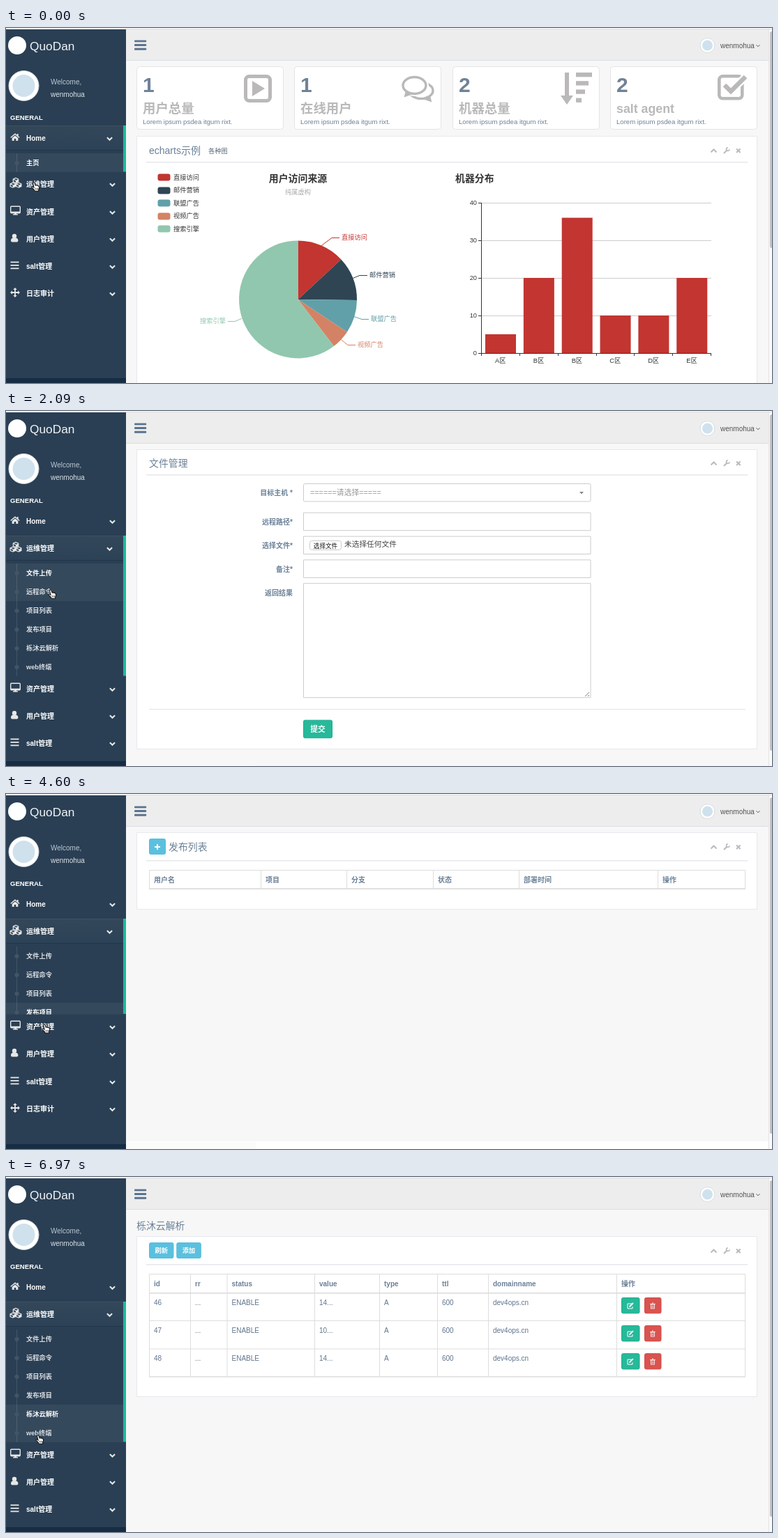
An HTML page with a canvas that plays this animation: 1098x510 px, repeating every 8000 ms.

```html
<!DOCTYPE html>
<html lang="zh-CN">
<head>
<meta charset="utf-8">
<title>Admin console</title>
<style>
html, body { margin: 0; width: 100%; height: 100%; overflow: hidden; background: #fff; }
canvas { display: block; width: 1098px; height: 510px; }
</style>
</head>
<body>
<canvas id="stage" width="1098" height="510"></canvas>
<script>
const ctx = document.getElementById('stage').getContext('2d');
const LOOP = 8000, ROW = 27, PITCH = 39.27;
const FONT = '"Liberation Sans", "Noto Sans CJK SC", "Noto Sans CJK", sans-serif';
const SLATE = '#6b8097', TEAL = '#1abb9c', GREEN = '#26b99a', SKY = '#5bc0de', GREY = '#bab8b8', RED = '#c23531';
const BRAND = 'QuoDan', USER = 'wenmohua';

// The screen refreshes only at these moments.
const ticks = [0, 150, 480, 630, 780, 930, 1290, 1440, 1590, 1740, 1890, 2090, 2390, 2540, 2690, 2840, 3050,
  3380, 3530, 3680, 3830, 4010, 4450, 4600, 4780, 4930, 5080, 5240, 5420, 5570, 5870, 6020, 6170, 6320, 6470, 6670, 6970];
const MENU_CLICK = 430;
const loads = [
  { at: 1540, page: filePage }, { at: 2340, page: remotePage }, { at: 3330, page: () => listPage('项目列表') },
  { at: 4374, page: () => listPage('发布列表') }, { at: 5731, page: dnsPage }
];
const pointerPath = [[0, 42, 228], [780, 42, 228], [930, 46, 231], [1290, 62, 246], [1440, 66, 250], [1740, 66, 250],
  [2090, 66, 263], [2540, 66, 263], [3050, 66, 293], [3530, 66, 293], [4010, 60, 322], [4450, 58, 327],
  [4600, 57, 337], [5080, 56, 357], [5420, 56, 358], [5570, 51, 349], [6020, 51, 349], [6670, 50, 376], [6970, 48, 377]];
const subItems = ['文件上传', '远程命令', '项目列表', '发布项目', '栎沐云解析', 'web终端'];
const menu = [['Home', homeIcon], ['运维管理', cubesIcon], ['资产管理', desktopIcon],
  ['用户管理', userIcon], ['salt管理', barsIcon], ['日志审计', arrowsIcon]];

const clamp = v => Math.max(0, Math.min(1, v));
const swing = p => 0.5 - Math.cos(Math.PI * clamp(p)) / 2;

function rect(x, y, w, h, color) {
  ctx.fillStyle = color;
  ctx.fillRect(x, y, w, h);
}
function box(x, y, w, h, fill, stroke, r = 0) {
  ctx.beginPath();
  ctx.roundRect(x + .5, y + .5, w - 1, h - 1, r);
  paint(fill, stroke);
}
function paint(fill, stroke, width = 1) {
  if (fill) { ctx.fillStyle = fill; ctx.fill(); }
  if (stroke) { ctx.strokeStyle = stroke; ctx.lineWidth = width; ctx.stroke(); }
}
function disc(x, y, r, fill, stroke, width) {
  ctx.beginPath();
  ctx.arc(x, y, r, 0, 7);
  paint(fill, stroke, width);
}
function trace(points, closed) {
  ctx.beginPath();
  for (const [x, y] of points) ctx.lineTo(x, y);
  if (closed) ctx.closePath();
}
function poly(points, color) { trace(points, true); paint(color); }
function line(points, color, width = 1) { trace(points); paint(null, color, width); }

// y is the optical middle of the line of text.
function text(str, x, y, size, color, bold = false, align = 'left') {
  ctx.font = `${bold ? 'bold ' : ''}${size}px ${FONT}`;
  ctx.textAlign = align;
  ctx.fillStyle = color;
  ctx.fillText(str, x, y + size * .37);
}
function at(x, y, draw) {
  ctx.save();
  ctx.translate(x, y);
  draw();
  ctx.restore();
}
function chevron(x, y, w, dir, color, width) {
  line([[x - w, y - dir * w / 2], [x, y + dir * w / 2], [x + w, y - dir * w / 2]], color, width);
}

// Sidebar icons
const ICON = '#e7e7e7';
function homeIcon() {
  line([[-6.2, .5], [0, -4.8], [6.2, .5]], ICON, 1.6);
  poly([[-4.3, 1], [0, -2.6], [4.3, 1], [4.3, 5], [1.3, 5], [1.3, 2], [-1.3, 2], [-1.3, 5], [-4.3, 5]], ICON);
  rect(2.8, -5, 1.8, 3.5, ICON);
}
function cubesIcon() {
  for (const [x, y] of [[1, -4], [-3.2, 2.7], [5.2, 2.7]]) {
    trace([[x, y - 3.5], [x + 3.7, y - 1.8], [x + 3.7, y + 1.8], [x, y + 3.5], [x - 3.7, y + 1.8], [x - 3.7, y - 1.8]], true);
    paint(null, ICON, 1.2);
    poly([[x, y], [x + 3.7, y - 1.8], [x + 3.7, y + 1.8], [x, y + 3.5]], ICON);
    line([[x - 3.7, y - 1.8], [x, y]], ICON, 1.2);
  }
}
function desktopIcon() {
  ctx.beginPath();
  ctx.roundRect(-6.3, -6.8, 13.6, 9.6, 1);
  paint(null, ICON, 1.4);
  rect(-6, .7, 13, 2, ICON);
  rect(-1, 2.4, 3, 2.5, ICON);
  rect(-3, 4.3, 7, 1.4, ICON);
}
function userIcon() {
  disc(-1, -3, 3.2, ICON);
  ctx.beginPath();
  ctx.roundRect(-6, -.4, 10.4, 6, [4, 4, 2, 2]);
  paint(ICON);
}
function barsIcon() {
  for (const y of [-5.5, -1, 3.5]) rect(-6.5, y, 12, 1.8, ICON);
}
function arrowsIcon() {
  for (let i = 0; i < 4; i++) {
    poly([[-.9, 0], [-.9, -4], [-2.8, -4], [0, -7], [2.8, -4], [.9, -4], [.9, 0]], ICON);
    ctx.rotate(Math.PI / 2);
  }
}

function menuEntry(index, cy, active) {
  const [label, icon] = menu[index];
  if (active) {
    const shade = ctx.createLinearGradient(0, cy - 17, 0, cy + 17);
    shade.addColorStop(0, '#334759');
    shade.addColorStop(1, '#2c4257');
    rect(0, cy - 17, 168, 34, shade);
    rect(0, cy - 18, 168, 1, '#3c5164');
    rect(0, cy + 17, 168, 1, '#21364a');
  }
  at(13, cy - 1, icon);
  text(label, 29, cy, 10, '#fff', true);
  chevron(active ? 148.5 : 152.5, cy + 1, 3.6, 1, '#e7e7e7', 2);
}
function submenu(items, top, height, current, hover) {
  if (height <= 0) return;
  ctx.save();
  ctx.beginPath();
  ctx.rect(0, top, 172, height);
  ctx.clip();
  rect(15, top, 1, items.length * ROW, '#425668');
  items.forEach((label, i) => {
    const y = top + i * ROW;
    if (i === current || i === hover) rect(0, y, 168, ROW, 'rgba(255,255,255,.05)');
    disc(15.5, y + 14, 3, '#425668');
    text(label, 29, y + 13.5, 9.25, i === current ? '#fff' : '#d9dde1', true);
  });
  ctx.restore();
}
function sidebar(homeHeight, opsHeight, opsOpen, current, hover) {
  rect(0, 2, 172, 508, '#2a3f54');
  disc(16, 25, 13, '#fff');
  text(BRAND, 34, 25.5, 17.3, '#f2f4f6');
  disc(25.5, 83, 21.5, '#fff', '#d5dbe0', 1);
  disc(25.5, 83, 16, '#cfe1ed');
  text('Welcome,', 64, 77, 10, '#bac8d3');
  text(USER, 64, 95, 10, '#dce2e7');
  text('GENERAL', 6, 128, 9.6, '#fff', true);

  let cy = 158;
  menu.forEach((_, i) => {
    const active = i === (opsOpen ? 1 : 0);
    const height = [homeHeight, opsHeight][i] || 0;
    const y = Math.round(cy);
    menuEntry(i, y, active);
    if (i === 0) submenu(['主页'], y + 22, height, 0, -1);
    if (i === 1) submenu(subItems, y + 22, height, current, hover);
    if (active) rect(168, y - 18, 4, 40 + height - .5, TEAL);
    cy += PITCH + height;
  });
  rect(0, 503, 172, 7, '#172d44');
}

function topbar() {
  rect(172, 2, 921, 44, '#ededed');
  rect(172, 46, 921, 1, '#d9dee4');
  for (let i = 0; i < 3; i++) {
    ctx.beginPath();
    ctx.roundRect(184, 17.4 + i * 5.7, 17.2, 2.9, 1);
    paint('#5a738e');
  }
  disc(1005.5, 25, 10.5, '#fff', '#d8dde1', 1);
  disc(1005.5, 25, 7.5, '#cfe1ed');
  text(USER, 1024, 25.5, 10, '#515356');
  chevron(1078, 25.5, 2.5, 1, '#515356', 1);
}
function scrollbar(bottom) {
  rect(1093, 2, 5, 508, '#fafafa');
  rect(1093, 2, 1, 508, '#e4e4e4');
  ctx.beginPath();
  ctx.roundRect(1095, 5, 5, bottom - 5, 2.5);
  paint('#c1c1c1');
}
function tools(y) {
  const c = '#b9bbbf';
  chevron(1014.5, y + .5, 4, -1, c, 2);
  line([[1029, y + 4], [1034, y - 1]], c, 2.2);
  ctx.beginPath();
  ctx.arc(1034.8, y - 1.8, 2.3, .1, 4.7);
  paint(null, c, 1.6);
  line([[1047, y - 2.6], [1052.6, y + 3]], c, 2.1);
  line([[1052.6, y - 2.6], [1047, y + 3]], c, 2.1);
}
function panel(top, bottom, toolY, ruleY) {
  box(187, top, 890, bottom - top, '#fff', '#e6e9ed');
  rect(201, ruleY - 1, 862, 1.6, '#e6e9ed');
  tools(toolY);
}
function button(x, y, w, h, label, size, color, edge) {
  box(x, y, w, h, color, edge, 2);
  text(label, x + w / 2, y + h / 2, size, '#fff', true, 'center');
}
const greenButton = (x, y, label) => button(x, y, 42, 26.5, label, 10.8, GREEN, '#1fac8f');
const skyButton = (x, y, w, h, label, size) => button(x, y, w, h, label, size, SKY, '#54bddc');

// Dashboard
function playIcon() {
  ctx.beginPath();
  ctx.roundRect(343.5, 69.5, 35, 35, 5);
  paint(null, GREY, 5);
  poly([[353, 76], [353, 98], [371, 87]], GREY);
}
function bubble(x, y, rx, ry, dir) {
  ctx.beginPath();
  ctx.ellipse(x, y, rx, ry, 0, 0, 7);
  paint('#fff', GREY, 3.4);
  poly([[x - dir * rx * .75, y + ry * .55], [x - dir * rx * .9, y + ry + 5], [x - dir * rx * .05, y + ry]], GREY);
}
function commentsIcon() {
  bubble(595, 90, 17, 11.5, -1);
  ctx.beginPath();
  ctx.ellipse(586, 83, 20, 15, 0, 0, 7);
  paint('#fff');
  bubble(585.5, 82.5, 16.5, 12, 1);
}
function sortIcon() {
  rect(801, 64, 6, 36, GREY);
  poly([[795, 97], [813, 97], [804, 110]], GREY);
  [23, 18, 13, 8].forEach((w, i) => rect(817, 64 + i * 12.2, w, 6.3, GREY));
}
function checkIcon() {
  ctx.beginPath();
  ctx.roundRect(1022.3, 69.3, 33, 32, 5);
  paint(null, GREY, 4.6);
  line([[1030, 82], [1039, 91], [1060, 70]], '#fff', 11);
  line([[1030, 82], [1039, 91], [1060, 70]], GREY, 6.5);
}
const slices = [['直接访问', 335, RED], ['邮件营销', 310, '#2f4554'], ['联盟广告', 234, '#61a0a8'],
  ['视频广告', 135, '#d48265'], ['搜索引擎', 1548, '#91c7ae']];
const callouts = [[467, 301, 478], [507, 355, 518], [510, 418, 520], [490, 455, 501], [328, 421, 318]];

function pie() {
  const total = slices.reduce((sum, s) => sum + s[1], 0), cx = 418.5, cy = 390, r = 84.5;
  let from = -Math.PI / 2;
  slices.forEach(([label, value, color], i) => {
    box(217, 209 + Math.round(i * 18.5), 19, 11, color, null, 3);
    text(label, 240, 214.5 + i * 18.5, 9.25, '#333');
    const to = from + value / total * Math.PI * 2, mid = (from + to) / 2;
    ctx.beginPath();
    ctx.moveTo(cx, cy);
    ctx.arc(cx, cy, r, from, to);
    paint(color);
    const [ex, ey, end] = callouts[i], side = end > cx ? 1 : -1;
    line([[cx + r * Math.cos(mid), cy + r * Math.sin(mid)], [ex, ey + .5], [end, ey + .5]], color);
    text(label, end + 3 * side, ey, 9.25, color, false, side > 0 ? 'left' : 'right');
    from = to;
  });
}
function bars() {
  for (let v = 0; v <= 40; v += 10) {
    const y = 467 - v * 5.4;
    if (v) rect(681, y, 330, 1, '#ccc');
    rect(677, y, 4, 1, '#333');
    text(String(v), 675, y, 9.25, '#333', false, 'right');
  }
  [5, 20, 36, 10, 10, 20].forEach((v, i) => {
    rect(687 + i * 54.85, 467 - v * 5.4, 44, v * 5.4, RED);
    text('ABBCDE'[i] + '区', 708.7 + i * 54.85, 478, 9.25, '#333', false, 'center');
  });
  rect(681, 251, 1, 217, '#333');
  rect(681, 467, 330, 1, '#333');
  for (let i = 0; i <= 6; i++) rect(681 + Math.round(i * 54.85), 467, 1, 4, '#333');
}
function homePage() {
  [['1', '用户总量', playIcon], ['1', '在线用户', commentsIcon], ['2', '机器总量', sortIcon], ['2', 'salt agent', checkIcon]]
    .forEach(([count, label, icon], i) => {
      const x = 187 + Math.round(i * 226.3);
      box(x, 55, 211, 91, '#fff', '#e4e4e4', 4);
      text(count, x + 9, 81, 30, '#6f8298', true);
      text(label, x + 9, 115, i === 3 ? 17.8 : 18.4, GREY, true);
      text('Lorem ipsum psdea itgum rixt.', x + 9, 134, 9.6, SLATE);
      icon();
    });
  panel(155, 520, 176, 193);
  text('echarts示例', 205, 176, 14, SLATE);
  text('各种图', 290, 177, 9.25, '#5b6b7b');
  text('用户访问来源', 418.5, 216, 13.9, '#333', true, 'center');
  text('纯属虚构', 418.5, 235.5, 9.25, '#aaa', false, 'center');
  text('机器分布', 644, 216, 13.9, '#333', true);
  pie();
  bars();
}

// Forms and tables
function field(label, y, labelY, h = 26.5) {
  text(label, 411, labelY, 10, SLATE, true, 'right');
  box(426, y, 412.5, h, '#fff', '#ccc');
}
function hostSelect() {
  text('目标主机 *', 411, 117.5, 10, SLATE, true, 'right');
  box(426, 104, 412.5, 26.5, '#fff', '#ccc', 2);
  text('======请选择=====', 436, 117.5, 10.8, '#999');
  poly([[822, 116], [828, 116], [825, 119.5]], '#888');
}
function filePage() {
  panel(55, 486, 75, 92);
  text('文件管理', 205, 75, 13.9, SLATE);
  hostSelect();
  field('远程路径*', 145.7, 159);
  field('选择文件*', 179.6, 193);
  box(435, 186, 46, 14, '#fff', '#c9c9c9', 3);
  text('选择文件', 458, 193.5, 8.6, '#111', false, 'center');
  text('未选择任何文件', 485, 191.5, 10.7, '#444');
  field('备注*', 213.4, 227);
  field('返回结果', 247.2, 261, 165);
  line([[830, 410], [836, 404]], '#888');
  line([[834, 410], [836, 408]], '#888');
  rect(205, 428, 855, 1, '#e0e3e6');
  greenButton(426, 443.7, '提交');
}
function remotePage() {
  panel(55, 246, 75, 92);
  text('远程管理', 205, 75, 13.9, SLATE);
  hostSelect();
  field('远程命令 *', 145.7, 159);
  rect(205, 187, 855, 1, '#e0e3e6');
  greenButton(426, 203.3, '运行');
  skyButton(474.5, 203.3, 63.5, 26.5, '查看结果', 10.8);
}
function table(columns, labels, top, rowEnds) {
  const bottom = rowEnds[rowEnds.length - 1], edge = '#ddd';
  box(205, top, 855, bottom - top + 1, '#fff', edge);
  columns.slice(1).forEach(x => rect(x, top, 1, bottom - top, edge));
  rowEnds.forEach((y, i) => rect(205, y, 855, i ? 1 : 1.6, edge));
  labels.forEach((label, i) => text(label, columns[i] + 7, top + 14, 10, SLATE, true));
}
function listPage(title) {
  panel(55, 166, 76, 96);
  skyButton(205, 64, 24, 23, '', 10);
  rect(213, 75, 8, 2, '#fff');
  rect(216, 72, 2, 8, '#fff');
  text(title, 233, 76, 13.9, SLATE);
  table([205, 365, 488, 612, 735, 934], ['用户名', '项目', '分支', '状态', '部署时间', '操作'], 109, [135.5]);
}
function editIcon() {
  line([[2, -3], [-4, -3], [-4, 4], [3, 4], [3, 1]], '#fff', 1);
  line([[-1.5, 1.5], [4, -4]], '#fff', 1.8);
}
function trashIcon() {
  ctx.strokeStyle = '#fff';
  ctx.lineWidth = .8;
  ctx.strokeRect(-2.5, -2, 5, 6);
  line([[-4, -2.5], [4, -2.5]], '#fff', .8);
  line([[-1, -4], [1, -4]], '#fff');
  line([[-.8, -.5], [-.8, 3]], '#fff', .7);
  line([[.9, -.5], [.9, 3]], '#fff', .7);
}
function dnsPage() {
  const columns = [205, 264, 316.5, 442, 535, 618, 691, 875];
  text('栎沐云解析', 187, 70, 13.9, SLATE);
  panel(85, 316, 106, 126);
  skyButton(205, 94, 35.5, 23, '刷新', 9.25);
  skyButton(244.3, 94, 35.5, 23, '添加', 9.25);
  table(columns, ['id', 'rr', 'status', 'value', 'type', 'ttl', 'domainname', '操作'], 139, [166, 206, 246.5, 286.5]);
  ['14...', '10...', '14...'].forEach((value, i) => {
    const y = 180 + i * 40.1;
    [46 + i, '...', 'ENABLE', value, 'A', '600', 'dev4ops.cn']
      .forEach((cell, c) => text(String(cell), columns[c] + 7, y, 10, '#5f748c'));
    box(882, y - 7, 26.5, 23.3, GREEN, '#1fac8f', 2);
    at(895, y + 5, editIcon);
    box(915, y - 7, 24.5, 23.3, '#d9534f', '#d64a45', 2);
    at(927, y + 5, trashIcon);
  });
}

function pointerAt(t) {
  const next = pointerPath.findIndex(p => p[0] > t);
  if (next < 0) return pointerPath[pointerPath.length - 1].slice(1);
  const [t0, x0, y0] = pointerPath[next - 1], [t1, x1, y1] = pointerPath[next];
  const k = (t - t0) / (t1 - t0);
  return [x0 + (x1 - x0) * k, y0 + (y1 - y0) * k];
}
function hand() {
  trace([[-3.6, -5.6], [-2.2, -6.4], [-1.2, -5.6], [.2, -1.8], [1.4, -2.4], [2.4, -1.6], [3.6, -2], [4.4, -.9],
    [5.3, -.8], [5.7, 1.6], [4.8, 4], [4.6, 6.2], [-.8, 6.2], [-2, 4], [-5.2, 1.2], [-4.8, 0], [-3.6, 0], [-2, 1.2]], true);
  paint('#fff', '#111', 1.1);
  for (const x of [.2, 2, 3.7]) line([[x, 2], [x + .2, 4.6]], '#222', .7);
}

function draw(time) {
  const t = ticks.filter(tick => tick <= time).pop();
  const current = loads.filter(l => l.at <= t).length - 1;
  const load = loads[current];
  const opsOpen = t >= MENU_CLICK;
  const toggled = swing((t - MENU_CLICK) / 400);
  const opened = load ? swing((t - load.at) / 400) : toggled;
  const opsHeight = opened * ROW * subItems.length;
  const [px, py] = pointerAt(t);
  const offset = py - 6 - 219;
  const hover = opsOpen && offset >= 0 && offset < opsHeight ? Math.floor(offset / ROW) : -1;

  rect(0, 0, 1098, 510, '#fff');
  rect(0, 1, 1098, 1, '#dcdcdc');
  rect(172, 2, 921, 508, '#f7f7f7');
  topbar();
  (load ? load.page : homePage)();
  const loading = load && opened < .995;
  if (loading) rect(172, 499, 921, 11, '#fff');
  if (t >= 1290) {
    const h = loading ? 10 : load ? 1 : 7;
    ctx.beginPath();
    ctx.roundRect(172, 510 - h, 186, h, [0, Math.min(3, h), 0, 0]);
    paint('#fbfbfb');
  }
  scrollbar(load ? 488 : 316);
  sidebar(ROW * (1 - toggled), opsHeight, opsOpen, current, hover);
  at(px, py, hand);
}
function frame(now) {
  draw(now % LOOP);
  requestAnimationFrame(frame);
}
requestAnimationFrame(frame);
</script>
</body>
</html>
```
